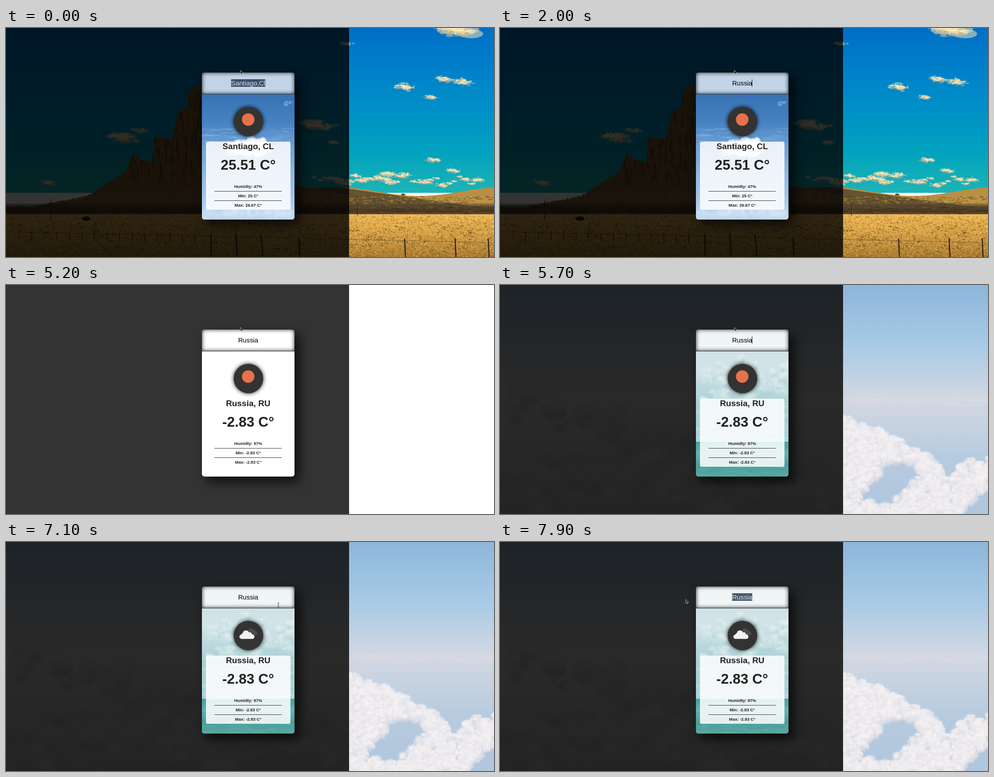
These frames come from a looping animation (1091x514 px, 8 s). An HTML page with a canvas:

```html
<!DOCTYPE html>
<html lang="en">
<head>
<meta charset="utf-8">
<title>Weather card</title>
<style>
  html, body { margin: 0; width: 100%; height: 100%; overflow: hidden; background: #fff; }
  #stage { position: relative; width: 1091px; height: 514px; overflow: hidden; }
  #stage canvas, #stage svg, #shade, #card, #search, #panel { position: absolute; left: 0; top: 0; }
  #shade { width: 767px; height: 514px; background: rgba(0, 0, 0, .8); }
  #card {
    left: 438px; top: 100px; width: 207px; height: 330px; border-radius: 6px; background: #fff;
    box-shadow: 11px 11px 26px rgba(0, 0, 0, .75);
  }
  #card canvas { border-radius: 6px; }
  #search {
    width: 207px; height: 49px; box-sizing: border-box; border-radius: 6px 6px 0 0;
    background: rgba(255, 255, 255, .7); border-bottom: 1px solid #333;
    box-shadow: inset 0 0 10px rgba(0, 0, 0, .85);
  }
  #badge {
    position: absolute; left: 70.5px; top: 77px; width: 66px; height: 66px; border-radius: 50%;
    background: #333; box-shadow: 0 0 10px rgba(0, 0, 0, .9);
  }
  #panel { left: 9px; top: 155px; width: 188.5px; height: 152.5px; border-radius: 4px; background: rgba(255, 255, 255, .85); }
  text { font-family: "Liberation Sans", Arial, sans-serif; text-anchor: middle; fill: #222; font-weight: bold; }
  .typed { font-weight: normal; font-size: 14.75px; fill: #000; }
  .small { font-size: 9.45px; }
</style>
</head>
<body>
<div id="stage">
  <canvas id="desert" width="1091" height="514"></canvas>
  <canvas id="clouds" width="1091" height="514"></canvas>
  <div id="shade"></div>
  <div id="card">
    <canvas id="blueSky" width="207" height="330"></canvas>
    <canvas id="tealSea" width="207" height="330"></canvas>
    <div id="search"></div>
    <div id="panel"></div>
    <div id="badge"></div>
  </div>
  <svg width="1091" height="514">
    <clipPath id="picked"><rect id="pickedArea" y="115" height="17"/></clipPath>
    <text class="typed" id="typed" x="541.5" y="128.800"></text>
    <g clip-path="url(#picked)">
      <rect id="pickedFill" x="438" y="115" width="207" height="17"/>
      <text class="typed" id="pickedText" x="541.5" y="128.800" style="fill:#d3e1ee"></text>
    </g>
    <rect id="caret" y="115.5" width="1" height="16"/>
    <circle id="sun" cx="541.5" cy="205.5" r="14" fill="#e9704c"/>
    <g id="cloudIcon">
      <path d="M542 208a5 5 0 0 1-1-9 6.5 6.5 0 0 1 12-2 4.500 4.500 0 0 1 5 4 4 4 0 0 1 0 8z" fill="#4b4b4b"/>
      <path d="M527 217.500a5 5 0 0 1-.5-10 4 4 0 0 1 3-3 7 7 0 0 1 13.500-1.500 5 5 0 0 1 7 4.500 5 5 0 0 1 1 10z" fill="#f2f2f2"/>
    </g>
    <text id="place" x="541.5" y="272.300" font-size="18.85"></text>
    <text id="degrees" x="541.5" y="318" font-size="31.5"></text>
    <text class="small" id="humidity" x="541.5" y="359.300"></text>
    <text class="small" id="low" x="541.5" y="380"></text>
    <text class="small" id="high" x="541.5" y="400.700"></text>
    <path d="M466 366.500H616.500M466 387.500H616.500" stroke="#333"/>
    <path id="arrow" d="M0 0V8.500L2 6.700 3.300 9.500 4.700 8.900 3.500 6.200H6Z" fill="#111" stroke="#ddd" stroke-width=".8"/>
    <path id="beam" d="M-2-4.500H2M0-4.500V4.500M-2 4.500H2" fill="none" stroke="#444"/>
  </svg>
</div>
<script>
const $ = id => document.getElementById(id);
const context = id => $(id).getContext('2d');
const WIDTH = 1091, HEIGHT = 514, SPLIT = 767;

let seed = 7;
function random(min = 0, max = 1) {
  seed = (seed * 16807) % 2147483647;
  return min + (max - min) * seed / 2147483647;
}
const spread = () => random() + random() + random() - 1.5;

// Fills a box with evenly spaced colors from top to bottom.
function fade(c, x, y, w, h, colors) {
  const g = c.createLinearGradient(0, y, 0, y + h);
  colors.forEach((color, i) => g.addColorStop(i / (colors.length - 1), color));
  c.fillStyle = g;
  c.fillRect(x, y, w, h);
}

function oval(c, x, y, rx, ry, color) {
  c.beginPath();
  c.ellipse(x, y, rx, ry, 0, 0, 7);
  c.fillStyle = color;
  c.fill();
}

// Fills everything between a skyline and a floor.
function land(c, color, from, to, skyline, floor) {
  c.beginPath();
  c.moveTo(from, floor);
  for (let x = from; x <= to; x++) c.lineTo(x, skyline(x));
  c.lineTo(to, floor);
  c.fillStyle = color;
  c.fill();
}

function speckle(c, count, x, y, w, h, colors, long, tall) {
  for (let i = 0; i < count; i++) {
    c.fillStyle = colors[Math.floor(random(0, colors.length))];
    c.fillRect(x + random(0, w), y + random(0, h), random(1, long), random(1, tall));
  }
}

// A ragged, wind-drawn cloud: shaded base first, lit crown on top.
function drift(c, x, y, w) {
  const h = w * .2;
  for (const [rgb, drop] of [['178,178,158', h * .2], ['255,232,180', -h * .1]]) {
    for (let i = 0; i < w; i++) {
      const u = spread();
      oval(c, x + u * w * .38, y + drop + u * h * .2 + spread() * h * (.6 - Math.abs(u) * .25), random(1, w / 12 + 1), random(.6, w / 32 + .8), `rgba(${rgb},.5)`);
    }
  }
}

// A soft round cloud, lit from above.
function billow(c, x, y, r, light, dark, alpha) {
  for (let i = 0; i < 26; i++) {
    const angle = random(0, 7), away = r * Math.sqrt(random()) * .8;
    const dy = Math.sin(angle) * away * .8;
    const mix = Math.min(1, Math.max(0, .6 - dy / r * .7 + random(-.25, .25)));
    const rgb = light.map((n, k) => Math.round(dark[k] + (n - dark[k]) * mix));
    const px = x + Math.cos(angle) * away, py = y + dy, size = r * random(.25, .5);
    const g = c.createRadialGradient(px, py, size * .3, px, py, size);
    g.addColorStop(0, `rgba(${rgb},${alpha})`);
    g.addColorStop(1, `rgba(${rgb},0)`);
    c.fillStyle = g;
    c.fillRect(px - size, py - size, size * 2, size * 2);
  }
}

// A skyline through key points, roughened with seeded noise.
function ridge(points, rough) {
  return x => {
    const i = Math.max(1, points.findIndex(p => p[0] >= x));
    const [x0, y0] = points[i - 1], [x1, y1] = points[i];
    return y0 + (y1 - y0) * (x - x0) / (x1 - x0) + random(-rough, rough);
  };
}

function paintDesert(c) {
  fade(c, 0, 0, WIDTH, 370, ['#006fc6', '#0080c9', '#0090c8', '#00a2be', '#1cb4b6']);
  for (let i = 0; i < 6; i++) oval(c, 1003 + spread() * 50, 4 + spread() * 10, 26, 10, 'rgba(225,215,180,.6)');
  const drifts = [
    [1003, 3, 95], [980, 115, 46], [1020, 121, 50], [893, 132, 54], [949, 155, 36], [956, 296, 40], [855, 328, 48],
    [892, 328, 32], [1000, 320, 40], [760, 35, 32], [695, 218, 86], [732, 257, 34], [300, 230, 42], [262, 246, 80], [95, 347, 42]
  ];
  for (const place of drifts) drift(c, ...place);
  for (let x = 690; x < 1060; x += 13) drift(c, x, 340 + spread() * 13, random(14, 42));

  const hill = x => 367 + 10 * Math.sin((x - 830) / 60);
  land(c, '#b98f45', 645, WIDTH, hill, 425);
  land(c, '#665331', 645, WIDTH, x => Math.max(hill(x), 361 + (x - SPLIT) * .14), 425);
  speckle(c, 500, SPLIT, 377, 324, 18, ['rgba(60,45,22,.4)', 'rgba(220,170,75,.4)'], 9, 1.5);
  oval(c, 888, 374, 5, 3, '#7a5a2e');

  const butte = ridge([
    [0, 412], [180, 378], [268, 322], [285, 279], [300, 296], [328, 300], [331, 245], [372, 249],
    [384, 188], [404, 180], [409, 140], [440, 126], [520, 126], [645, 354], [SPLIT, 374]
  ], 2.5);
  c.save();
  land(c, '#765829', 0, SPLIT, butte, 432);
  c.clip();
  speckle(c, 800, 270, 126, 200, 210, ['rgba(35,22,10,.3)', 'rgba(170,125,65,.2)'], 4, 28);
  fade(c, 0, 335, SPLIT, 97, ['rgba(130,100,50,0)', '#826638', '#5c4722']);
  speckle(c, 1600, 0, 330, SPLIT, 100, ['rgba(50,36,15,.3)', 'rgba(165,130,65,.25)'], 10, 3);
  c.restore();

  fade(c, 0, 394, WIDTH, 27, ['rgba(74,60,38,.3)', '#51422b', '#453823', '#6e5730']);
  speckle(c, 500, 0, 398, WIDTH, 22, ['rgba(30,24,14,.4)', 'rgba(140,110,60,.3)'], 16, 1.6);
  fade(c, 0, 418, WIDTH, 96, ['#efb857', '#dfa94a', '#c9953f', '#ab7c30']);
  speckle(c, 9000, 0, 419, WIDTH, 95, ['rgba(255,216,120,.45)', 'rgba(84,58,20,.4)', 'rgba(150,106,38,.45)'], 3.5, 2.2);
  for (let i = 0; i < 260; i++) {
    const y = random(436, HEIGHT), x = random(0, WIDTH), size = (y - 410) / 9;
    for (let k = 0; k < 14; k++) oval(c, x + spread() * size * 1.6, y + spread() * size * .5, random(.6, 2), random(.5, 1.3), k % 3 ? 'rgba(88,64,26,.45)' : 'rgba(235,190,100,.5)');
  }
  oval(c, 179, 428, 10, 5, '#30240f');

  const post = (x, top, bottom, lean, width) => {
    c.beginPath();
    c.moveTo(x, top);
    c.lineTo(x + lean, bottom);
    c.lineWidth = width;
    c.strokeStyle = '#2c2418';
    c.stroke();
  };
  post(786, 390, 421, 0, 1);
  post(100, 384, 432, 0, 1.2);
  for (let x = 30; x < 430; x += 28) post(x, 454 + x / 60, 473 + x / 40, 0, 1.2);
  for (let x = 458; x < 600; x += 56) post(x, 462, HEIGHT, (x - 440) / 30, 2.5);
  for (const x of [655, 891, 1004, 1078]) post(x, 472, HEIGHT, 2, 2.5);
  post(0, 457, 482, WIDTH, .5);
}

function paintClouds(c) {
  fade(c, 0, 0, WIDTH, HEIGHT, ['#8db6da', '#a6c9e6', '#d3d8e2', '#b7cbdf', '#afc6dd']);
  fade(c, 0, 0, SPLIT, HEIGHT, ['#96b0c8', '#b3bfca', '#d2d1d0', '#c3c2c1', '#b2b2b3']);
  for (let i = 0; i < 90; i++) {
    const x = random(-20, 740);
    billow(c, x, random(240 + x * .2, HEIGHT), random(20, 50), [202, 202, 201], [164, 164, 166], .3);
  }

  c.save();
  c.beginPath();
  c.rect(SPLIT, 0, WIDTH - SPLIT, HEIGHT);
  c.clip();
  fade(c, SPLIT, 0, WIDTH, HEIGHT, ['#8db6da', '#a6c9e6', '#d3d8e2', '#b7cbdf', '#afc6dd']);
  speckle(c, 60, SPLIT, 245, 324, 25, ['rgba(238,222,226,.25)'], 50, 2);
  // The cloud tops dip towards a valley near the right edge.
  const top = x => 452 - 10.5 * Math.sqrt(Math.abs(x - 1005));
  for (let y = 290; y < 540; y += 7) {
    for (let x = 755; x < 1110; x += 13) {
      const px = x + random(-7, 7), depth = y - top(px);
      const gap = Math.sin(px / 33) + Math.sin(y / 24 + px / 60);
      if (depth > 8 && gap < 1.15 - depth / 200) billow(c, px, y, random(9, 18), [248, 243, 244], [202, 207, 219], .5);
    }
  }
  c.restore();
}

function paintBlueSky(c) {
  fade(c, 0, 0, 207, 330, ['#2f69ab', '#3873b5', '#4681c1', '#6ba0d6', '#8bb5df', '#a0c4e8', '#c6daef']);
  speckle(c, 160, -20, 125, 210, 60, ['rgba(225,238,250,.12)'], 45, 2.5);
  speckle(c, 25, 182, 64, 14, 10, ['rgba(225,238,250,.25)'], 8, 2);
  for (let i = 0; i < 30; i++) {
    const u = spread();
    billow(c, 110 + u * 46, 162 + Math.abs(u) * 16 + spread() * 14, random(10, 18), [255, 255, 255], [215, 228, 243], .45);
  }
  for (let x = 0; x < 207; x += 16) billow(c, x, 322, 20, [225, 236, 248], [165, 200, 232], .1 + x / 900);
}

function paintTealSea(c) {
  fade(c, 0, 0, 207, 252, ['#cadde1', '#d2e4e7', '#a9d0d5', '#a8d5d9']);
  for (let i = 0; i < 45; i++) {
    const x = random(0, 207);
    billow(c, x, random(62 + Math.abs(x - 104) * .25, 160), random(11, 22), [240, 246, 246], [156, 200, 207], .25);
  }
  speckle(c, 120, -30, 160, 240, 90, ['rgba(255,255,255,.14)', 'rgba(90,170,178,.1)'], 60, 5);
  fade(c, 0, 252, 207, 78, ['#3f9fa4', '#66b3b3', '#4a9f9c', '#57a8a2']);
  speckle(c, 200, 0, 252, 207, 78, ['rgba(255,255,255,.06)', 'rgba(10,95,95,.08)'], 30, 2);
}

paintDesert(context('desert'));
paintClouds(context('clouds'));
paintBlueSky(context('blueSky'));
paintTealSea(context('tealSea'));

const LOOP = 8000, WORD = 'Russia', CENTER = 541.5;
const KEYS = [500, 900, 1000, 1600, 1800, 2000];
const BLINKS = [500, 5000, 5700, 5900, 6500, 7100];
const REPORTS = {
  desert: ['Santiago, CL', '25.51 C°', '47%', '25 C°', '26.67 C°'],
  clouds: ['Russia, RU', '-2.83 C°', '97%', '-2.83 C°', '-2.83 C°']
};
const passed = (times, t) => times.filter(time => time <= t).length;
const show = (id, on) => { $(id).style.visibility = on ? 'visible' : 'hidden'; };
const write = (id, value) => { if ($(id).textContent !== value) $(id).textContent = value; };

function pointerAt(t) {
  if (t < 7100) return ['arrow', 524, 95];
  if (t >= 7900) return ['arrow', 415.5, 129];
  const drag = Math.min(4, Math.max(0, Math.floor((t - 7200) / 100))) / 4;
  return [drag < 1 ? 'beam' : 'arrow', 609 - 192 * drag, 141.5 - 16 * drag];
}

function render(t) {
  const before = t < 5200, after = t >= 5700;
  for (const id of ['desert', 'blueSky']) show(id, before);
  for (const id of ['clouds', 'tealSea']) show(id, after);
  show('sun', t < 6200);
  show('cloudIcon', t >= 6200);

  const [place, degrees, humidity, low, high] = REPORTS[before ? 'desert' : 'clouds'];
  write('place', place);
  write('degrees', degrees);
  write('humidity', 'Humidty: ' + humidity);
  write('low', 'Min: ' + low);
  write('high', 'Max: ' + high);

  const text = WORD.slice(0, passed(KEYS, t)) || 'Santiago,Cl';
  write('typed', text);
  write('pickedText', text);

  const [kind, x, y] = pointerAt(t);
  for (const id of ['arrow', 'beam']) show(id, id === kind);
  $(kind).setAttribute('transform', `translate(${x} ${y})`);

  const half = $('typed').getComputedTextLength() / 2;
  const end = CENTER + half;
  const pickedFrom = t < KEYS[0] ? 0 : t < 7300 ? end : x;
  const start = Math.max(CENTER - half, pickedFrom);
  $('pickedArea').setAttribute('x', start);
  $('pickedArea').setAttribute('width', Math.max(0, end - start));
  $('pickedFill').setAttribute('fill', before ? '#3a5068' : '#48586b');
  $('caret').setAttribute('x', Math.floor(end - .5));
  show('caret', passed(BLINKS, t) % 2 === 1);
}

const began = performance.now();
function tick() {
  render((performance.now() - began) % LOOP);
  requestAnimationFrame(tick);
}
tick();
</script>
</body>
</html>
```
